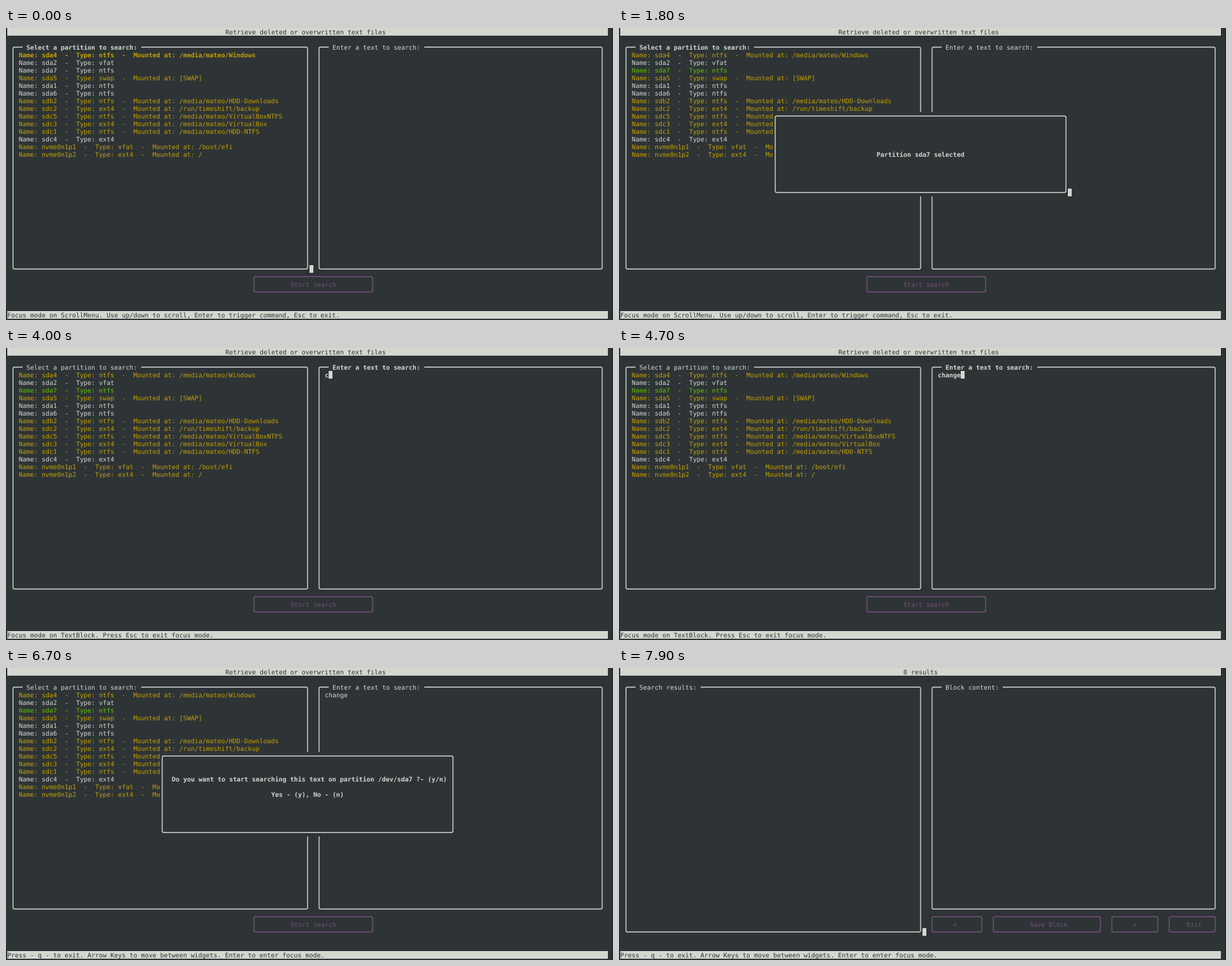
Write an HTML page that moves like this. It is 952 by 458 pixels and loops after 8000 ms.

```html
<!DOCTYPE html>
<html lang="en">
<head>
<meta charset="utf-8">
<title>Text file recovery</title>
<style>
html, body { margin: 0; width: 100%; height: 100%; overflow: hidden; background: #2e3436; }
svg { display: block; }
text {
  font: 9.966px "DejaVu Sans Mono", monospace;
  white-space: pre;
  text-rendering: geometricPrecision;
}
.bold { font-weight: bold; }
</style>
</head>
<body>
<svg id="screen" width="952" height="458" viewBox="0 0 952 458"></svg>
<script>
const BG = '#2e3436', WHITE = '#d3d7cf', YELLOW = '#c4a000', GREEN = '#4e9a06', PURPLE = '#75507b';
const LOOP = 8000;
const screen = document.getElementById('screen');

const partitions = [
  ['sda4', 'ntfs', '/media/mateo/Windows'],
  ['sda2', 'vfat'],
  ['sda7', 'ntfs'],
  ['sda5', 'swap', '[SWAP]'],
  ['sda1', 'ntfs'],
  ['sda6', 'ntfs'],
  ['sdb2', 'ntfs', '/media/mateo/HDD-Downloads'],
  ['sdc2', 'ext4', '/run/timeshift/backup'],
  ['sdc5', 'ntfs', '/media/mateo/VirtualBoxNTFS'],
  ['sdc3', 'ext4', '/media/mateo/VirtualBox'],
  ['sdc1', 'ntfs', '/media/mateo/HDD-NTFS'],
  ['sdc4', 'ext4'],
  ['nvme0n1p1', 'vfat', '/boot/efi'],
  ['nvme0n1p2', 'ext4', '/']
];

// Each track lists [start time, values...]; a missing cursor cell means blinked off.
const cursorTrack = [
  [0, 79, 31], [200], [600, 79, 31], [1200], [1300, 79, 31], [1800, 117, 21], [2400],
  [2600, 79, 31], [3000, 156, 31], [3600], [3700, 83, 3], [4000, 84, 3], [4100, 85, 3],
  [4300, 86, 3], [4400, 87, 3], [4600, 88, 3], [4700, 89, 3], [5200, 156, 31],
  [5700, 97, 34], [6100, 117, 21], [6700], [7100, 79, 34], [7700], [7900, 79, 34]
];
const rowTrack = [[0, 0], [600, 1], [1300, 2]];
const typedTrack = [[0, 0], [4000, 1], [4100, 2], [4300, 3], [4400, 4], [4600, 5], [4700, 6]];
const focusTrack = [[0, 'menu'], [2600, ''], [3700, 'text'], [5200, '']];
const popupTrack = [[0, ''], [1800, 'selected'], [2600, ''], [6100, 'confirm'], [7100, '']];

const status = {
  menu: 'Focus mode on ScrollMenu. Use up/down to scroll, Enter to trigger command, Esc to exit.',
  text: 'Focus mode on TextBlock. Press Esc to exit focus mode.',
  '': 'Press - q - to exit. Arrow Keys to move between widgets. Enter to enter focus mode.'
};

const at = (track, t) => track.filter(k => k[0] <= t).pop().slice(1);
const x = col => 2 + 6 * col;
const y = row => 12 * row;

const fill = (col, row, cols, rows, color) =>
  `<rect x="${x(col)}" y="${y(row)}" width="${6 * cols}" height="${12 * rows}" fill="${color}"/>`;

const text = (col, row, str, color = WHITE, bold = false) =>
  `<text x="${x(col)}" y="${y(row) + 9.5}" fill="${color}"${bold ? ' class="bold"' : ''}>` +
  str.replace(/</g, '&lt;') + '</text>';

const frame = (c0, r0, c1, r1, color = WHITE) =>
  `<rect x="${x(c0) + 3}" y="${y(r0) + 6}" width="${6 * (c1 - c0)}" height="${12 * (r1 - r0)}" ` +
  `rx="2.5" fill="none" stroke="${color}" stroke-width="1.4"/>`;

const panel = (c0, c1, r1, title, bold) =>
  frame(c0, 2, c1, r1) + fill(c0 + 3, 2, title.length + 2, 1, BG) + text(c0 + 4, 2, title, WHITE, bold);

const button = (c0, c1, col, label) => frame(c0, 32, c1, 34, PURPLE) + text(col, 33, label, PURPLE);

const bar = (row, col, str) => fill(0, row, 157, 1, WHITE) + text(col, row, str, BG);

function partitionRow([name, type, mount], i, current, chosen) {
  const line = `Name: ${name}  -  Type: ${type}` + (mount ? `  -  Mounted at: ${mount}` : '');
  const color = chosen && i === 2 ? GREEN : mount ? YELLOW : WHITE;
  return text(3, 3 + i, line, color, i === current);
}

function popup(kind) {
  const body = kind === 'confirm'
    ? text(43, 14, 'Do you want to start searching this text on partition /dev/sda7 ?- (y/n)', WHITE, true) +
      text(69, 16, 'Yes - (y), No - (n)', WHITE, true)
    : text(67, 16, 'Partition sda7 selected', WHITE, true);
  return fill(40, 11, 77, 11, BG) + frame(40, 11, 116, 21) + body;
}

function searchView(t, focus) {
  const [row] = at(rowTrack, t), [typed] = at(typedTrack, t), [kind] = at(popupTrack, t);
  return bar(0, 57, 'Retrieve deleted or overwritten text files') +
    panel(1, 78, 31, 'Select a partition to search:', focus === 'menu') +
    panel(81, 155, 31, 'Enter a text to search:', focus === 'text') +
    partitions.map((p, i) => partitionRow(p, i, row, t >= 1300)).join('') +
    text(83, 3, 'change'.slice(0, typed), WHITE, focus === 'text') +
    button(64, 95, 74, 'Start search') +
    (kind ? popup(kind) : '');
}

function resultsView() {
  return bar(0, 74, '0 results') +
    panel(1, 78, 34, 'Search results:') +
    panel(81, 155, 31, 'Block content:') +
    button(81, 94, 87, '<') + button(97, 125, 107, 'Save Block') +
    button(128, 140, 134, '>') + button(143, 155, 148, 'Exit');
}

function render(t) {
  const [focus] = at(focusTrack, t), [col, row] = at(cursorTrack, t);
  return '<path d="M0 0h1v458h-1zM950 0h2v458h-2z" fill="#262b2d"/>' +
    (t < 7100 ? searchView(t, focus) : resultsView()) +
    bar(37, 0, status[focus]) +
    (col ? fill(col, row, 1, 1, WHITE) : '');
}

let shown = '';
function tick() {
  const picture = render(performance.now() % LOOP);
  if (picture !== shown) screen.innerHTML = shown = picture;
  requestAnimationFrame(tick);
}
tick();
</script>
</body>
</html>
```
